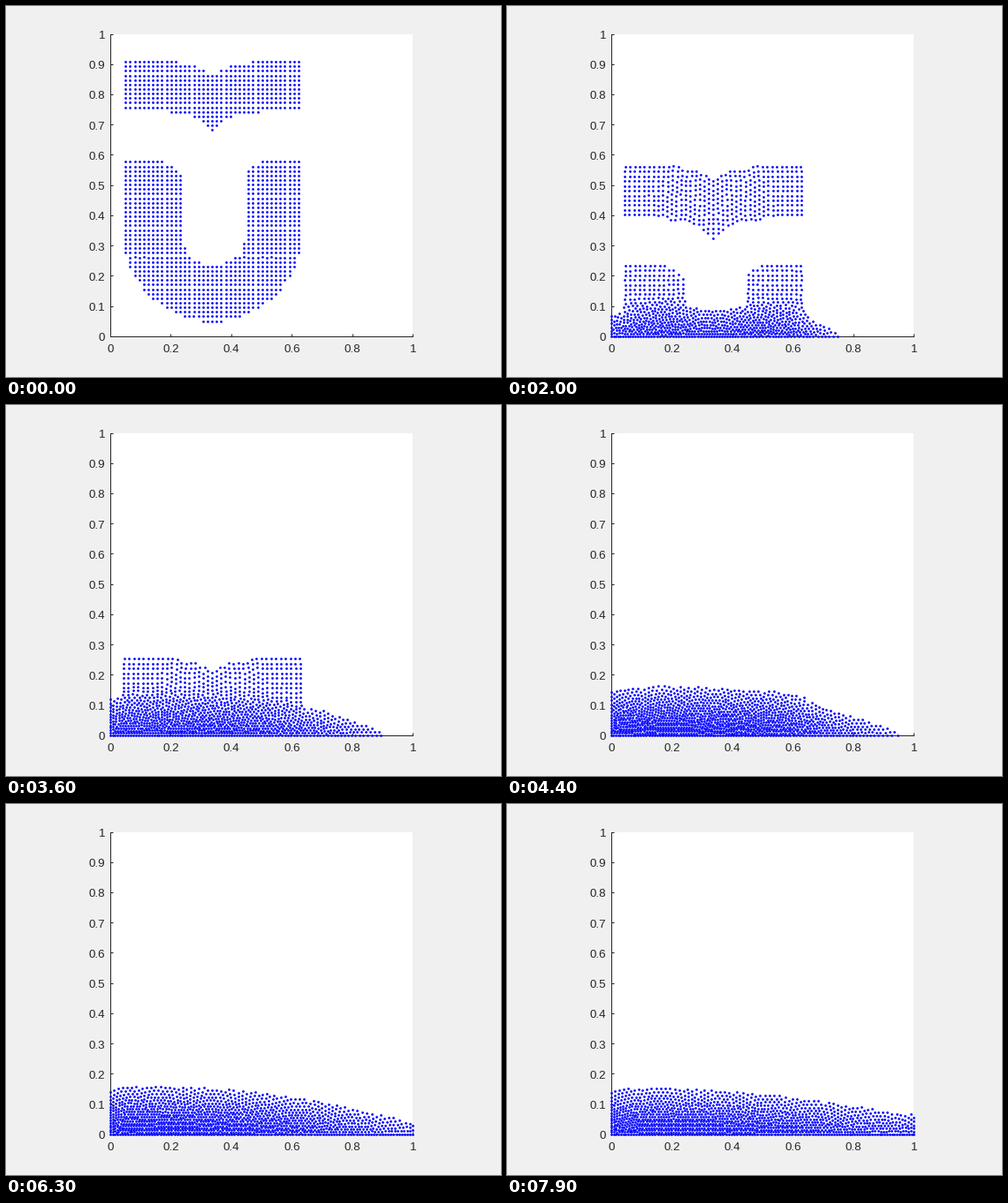
These frames come from a looping animation (560 by 420 pixels, 8 s). A matplotlib script:

```python
import numpy as np
import matplotlib.pyplot as plt
from matplotlib.animation import FuncAnimation
from matplotlib.transforms import ScaledTranslation

W, H, DPI = 560, 420, 100
FRAMES, INTERVAL = 80, 100
INK = "#262626"

# Lattice and forces, in axis units and frames
STEP = 0.01504
REACH = 0.0158
STIFF = 0.0137
GRAVITY, DRAG = 0.0109, 0.556
DAMP = 1.5
SUB, REFRESH, SKIN = 16, 4, 0.006
LAST = 38


def letter():
    """Lattice cells of the letter: a cup with a wedge-shaped bar above it."""
    rows = {}
    rim = [17, 13, 11, 9, 8, 6, 5, 4, 4, 3, 2, 2, 1, 1, 1]
    hollow = {13: (16, 22), 14: (14, 24), 15: (13, 26), 16: (13, 26),
              17: (12, 26), 33: (11, 27), 34: (10, 28), 35: (8, 30)}
    for j in range(36):
        a = rim[j] if j < len(rim) else 0
        cells = range(a, LAST - a + 1)
        if j > 12:
            lo, hi = hollow.get(j, (12, 27))
            cells = [i for i in cells if i <= lo or i >= hi]
        rows[j] = cells
    for k, half in enumerate([0, 1, 2, 4]):
        rows[42 + k] = range(19 - half, 20 + half)
    rows[46] = range(10, 30)
    for j in range(47, 55):
        rows[j] = range(LAST + 1)
    for j, (lo, hi) in {55: (17, 21), 56: (15, 23), 57: (11, 28)}.items():
        rows[j] = [i for i in range(LAST + 1) if i <= lo or i >= hi]
    cells = np.array([(i, j) for j in rows for i in rows[j]], float)
    return cells * STEP + [0.0505, 0.0503]


def near_pairs(p):
    q = p.astype(np.float32)
    dx = q[:, 0, None] - q[None, :, 0]
    dy = q[:, 1, None] - q[None, :, 1]
    a, b = np.nonzero(dx * dx + dy * dy < (REACH + SKIN) ** 2)
    keep = a < b
    return a[keep], b[keep]


def push(p, v, a, b):
    """Short-range repulsion with damping along each contact."""
    d = p[a] - p[b]
    r = np.sqrt((d * d).sum(1))
    on = r < REACH
    a, b, d = a[on], b[on], d[on]
    r = np.maximum(r[on], 0.004)
    n = d / r[:, None]
    closing = ((v[a] - v[b]) * n).sum(1)
    f = STIFF * ((REACH / r) ** 3 - 1) - DAMP * (1 - r / REACH) * closing
    f = n * f[:, None]
    size = len(p)
    return np.stack([np.bincount(a, f[:, k], size) - np.bincount(b, f[:, k], size)
                     for k in (0, 1)], axis=1)


def simulate():
    rng = np.random.default_rng(4)
    p = letter()
    p += rng.normal(0, 2e-5, p.shape)
    v = np.zeros_like(p)
    dt = 1 / SUB
    fade = np.exp(-DRAG * dt)
    fall = np.array([0, -GRAVITY])
    shots = [p.copy()]
    for _ in range(FRAMES - 1):
        for s in range(SUB):
            if s % REFRESH == 0:
                a, b = near_pairs(p)
            v = (v + dt * (fall + push(p, v, a, b))) * fade
            p = p + dt * v
            out = (p < 0) | (p > [1, np.inf])
            v[out] = 0
            p = np.clip(p, 0, [1, np.inf])
        shots.append(p.copy())
    return shots


shots = simulate()

plt.rcParams["font.family"] = "Liberation Sans"
px = 72 / DPI
fig = plt.figure(figsize=(W / DPI, H / DPI), dpi=DPI, facecolor="#f0f0f0")
ax = fig.add_axes([118 / W, 46.2 / H, 342.3 / W, 342.3 / H], facecolor="white")
ax.set(xlim=(0, 1), ylim=(0, 1),
       xticks=np.arange(6) / 5, yticks=np.arange(11) / 10)
ax.xaxis.set_major_formatter(lambda t, _: f"{t:g}")
ax.yaxis.set_major_formatter(lambda t, _: f"{t:g}")
ax.tick_params(direction="in", length=3.4 * px, width=px, color=INK,
               labelcolor=INK, labelsize=13.33 * px)
ax.tick_params(axis="x", pad=9 * px)
ax.tick_params(axis="y", pad=6 * px)
lower = ScaledTranslation(0, -1 / DPI, fig.dpi_scale_trans)
for label in ax.get_yticklabels():
    label.set_transform(label.get_transform() + lower)
for side, spine in ax.spines.items():
    spine.set(visible=side in ("left", "bottom"), linewidth=px, edgecolor=INK)

dots, = ax.plot([], [], "o", color="blue", markersize=2.75 * px,
                markeredgewidth=0, clip_on=False, zorder=5)


def draw(i):
    dots.set_data(shots[i][:, 0], shots[i][:, 1])
    return dots,


anim = FuncAnimation(fig, draw, frames=FRAMES, interval=INTERVAL,
                     repeat=True, repeat_delay=0, blit=False)
plt.show()
```
